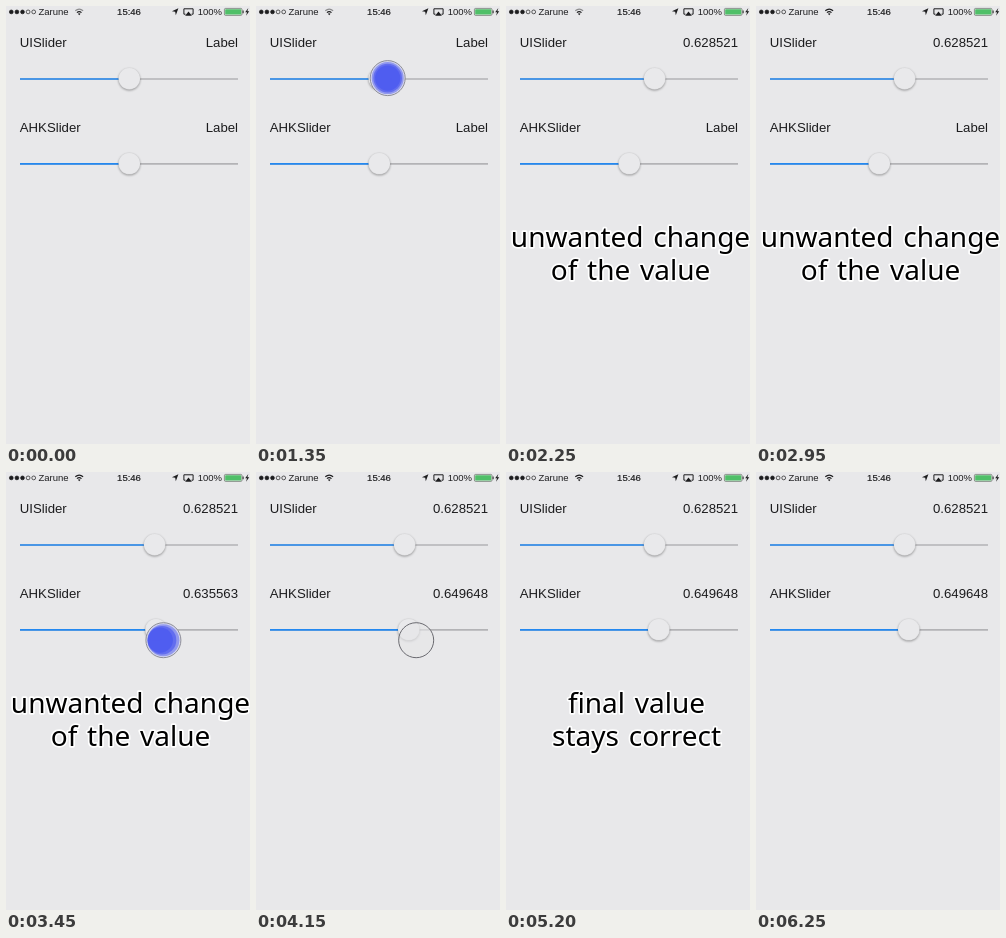
Recreate the animation shown at these times as an HTML page. Size 244 by 438 pixels, loop 6300 ms.

```html
<!DOCTYPE html>
<html lang="en">
<head>
<meta charset="utf-8">
<title>Slider comparison</title>
<style>
  html, body { margin: 0; width: 100%; height: 100%; overflow: hidden; background: #e8e8ea; }
  svg { display: block; width: 100vw; height: 100vh; font: 13.2px "Liberation Sans", Arial, sans-serif; fill: #1c1c1e; }
  .status { font-size: 9.5px; }
  .end { text-anchor: end; }
  .thumb { fill: #e9e9eb; stroke: #0000000f; stroke-width: .6; filter: drop-shadow(0 1.4px 1px #00000059); }
  .caption { font: 28px "Noto Sans", "Open Sans", sans-serif; word-spacing: 2.5px; text-anchor: middle; fill: #000;
    stroke: #fff; stroke-width: 3.4; stroke-linejoin: round; paint-order: stroke; }
</style>
</head>
<body>
<svg viewBox="0 0 244 438">
  <g class="status">
    <g id="signal" stroke="#1c1c1e" stroke-width=".7"></g>
    <text x="32.5" y="9.2">Zarune</text>
    <g fill="none" stroke="#1c1c1e" stroke-width="1.2">
      <path id="wifi" d="M69.3 4.8Q73.2 1.4 77.1 4.8"/>
      <path d="M70.9 6.6Q73.2 4.7 75.5 6.6"/>
    </g>
    <path d="M71.9 7.7Q73.2 6.8 74.5 7.7L73.2 9.2Z"/>
    <text x="123" y="9.2" text-anchor="middle" stroke="#1c1c1e" stroke-width=".2">15:46</text>
    <path d="M172.4 2.2L169.8 9.2L169.2 5.8L165.9 5.2Z"/>
    <path d="M179.5 8.2H177.9V2.8H187.1V8.2H185.5" fill="none" stroke="#1c1c1e"/>
    <path d="M182.5 5.4L185.9 9.7H179.1Z"/>
    <text x="216" y="9.2" class="end">100%</text>
    <rect x="218.4" y="2.4" width="17.6" height="7" rx="1.2" fill="none" stroke="#4a5a4c" stroke-width=".6"/>
    <rect x="219.2" y="3.2" width="16" height="5.4" rx=".6" fill="#4fbf68"/>
    <path d="M236.6 4.6h1v2.6h-1z"/>
    <path d="M242.3 2L239.2 6.3H241L240.1 9.8L243.2 5.3H241.4Z"/>
  </g>
  <g id="sliders"></g>
  <g id="touch">
    <circle id="ring" r="17.5" stroke-width=".9"/>
    <g id="trail"></g>
  </g>
  <g id="captions" class="caption"></g>
</svg>
<script>
const LOOP = 6300, STEP = 50, UNITS = 568, START = 284;
const $ = id => document.getElementById(id);
const clamp = u => Math.max(0, Math.min(1, u));
const ease = u => (u = clamp(u), u * u * (3 - 2 * u));

function add(parent, tag, attrs, text = '') {
  const el = document.createElementNS('http://www.w3.org/2000/svg', tag);
  set(el, attrs);
  el.textContent = text;
  return parent.appendChild(el);
}
function set(el, attrs) {
  for (const key in attrs) el.setAttribute(key, attrs[key]);
}

for (let i = 0; i < 5; i++)
  add($('signal'), 'circle', { cx: 5.3 + i * 5.6, cy: 5.9, r: 1.9, fill: i < 3 ? '#1c1c1e' : 'none' });

// Times are in ms; values count steps of 1 / UNITS.
const sliders = [
  { name: 'UISlider', y: 73, fingerY: 72.1, offset: 8.4, press: 1350, from: 1380, to: 1650,
    target: 356, release: 1650, lift: 2000, slip: 1 },
  { name: 'AHKSlider', y: 157.9, fingerY: 168.2, offset: 7.4, press: 3000, from: 3030, to: 3550,
    target: 369, release: 3950, lift: 4250, slip: 0 }
];
for (const s of sliders) {
  const g = $('sliders');
  add(g, 'text', { x: 13.8, y: s.y - 31.6 }, s.name);
  s.label = add(g, 'text', { x: 232, y: s.y - 31.6, class: 'end' });
  add(g, 'path', { d: `M14 ${s.y}H232`, stroke: '#b3b3b6', 'stroke-width': 1.6 });
  s.fill = add(g, 'path', { stroke: '#2388f0', 'stroke-width': 1.7 });
  s.thumb = add(g, 'circle', { cy: s.y - .4, r: 10.8, class: 'thumb' });
}

const captions = [
  { x: 124.5, from: 2000, to: 3500, lines: ['unwanted change', 'of the value'] },
  { x: 130.5, from: 4250, to: 5750, lines: ['final value', 'stays correct'] }
];
for (const c of captions) {
  c.el = add($('captions'), 'g', {});
  c.lines.forEach((line, i) => add(c.el, 'text', { x: c.x, y: 240.8 + 33 * i }, line));
}

const trail = [0, 1, 2].map(i => ({
  lag: 25 * i,
  r: 16 - 1.7 * i,
  el: add($('trail'), 'circle', { 'fill-opacity': .5 + .2 * i })
}));

const show = (el, on) => el.style.display = on ? '' : 'none';
const valueAt = (s, t) =>
  Math.round(START + (s.target - START) * ease((t - s.from) / (s.to - s.from))) + (t >= s.lift ? s.slip : 0);
const thumbX = value => 123.3 + (value / UNITS - .5) * 197;

// The pressed dot leaves a short trail, then turns grey and shrinks away on release.
function drawTouch(s, t) {
  const fingerX = time => thumbX(valueAt(s, time)) + s.offset;
  const held = t < s.release;
  const left = 1 - clamp((t - s.release) / 180);
  set($('ring'), {
    cx: fingerX(t), cy: s.fingerY,
    stroke: held ? '#85858f' : '#5c5c62',
    fill: held ? '#d3d5ee' : '#e6e6e9', 'fill-opacity': held ? .9 : .65
  });
  for (const { lag, r, el } of trail)
    set(el, { cx: fingerX(t - lag), cy: s.fingerY, r: r * left, fill: held ? '#4e5bf0' : '#c9c9cf' });
}

function draw(t) {
  for (const s of sliders) {
    const value = valueAt(s, t), x = thumbX(value);
    s.label.textContent = value === START ? 'Label' : (value / UNITS).toFixed(6);
    s.fill.setAttribute('d', `M14 ${s.y}H${x}`);
    s.thumb.setAttribute('cx', x);
  }
  const active = sliders.find(s => t >= s.press && t < s.lift);
  show($('touch'), active);
  if (active) drawTouch(active, t);
  for (const c of captions) show(c.el, t >= c.from && t < c.to);
  $('wifi').setAttribute('opacity', t < 2650 ? .45 : 1);
}

const begin = performance.now();
function tick() {
  const t = (performance.now() - begin) % LOOP;
  draw(Math.floor(t / STEP) * STEP);
  requestAnimationFrame(tick);
}
tick();
</script>
</body>
</html>
```
